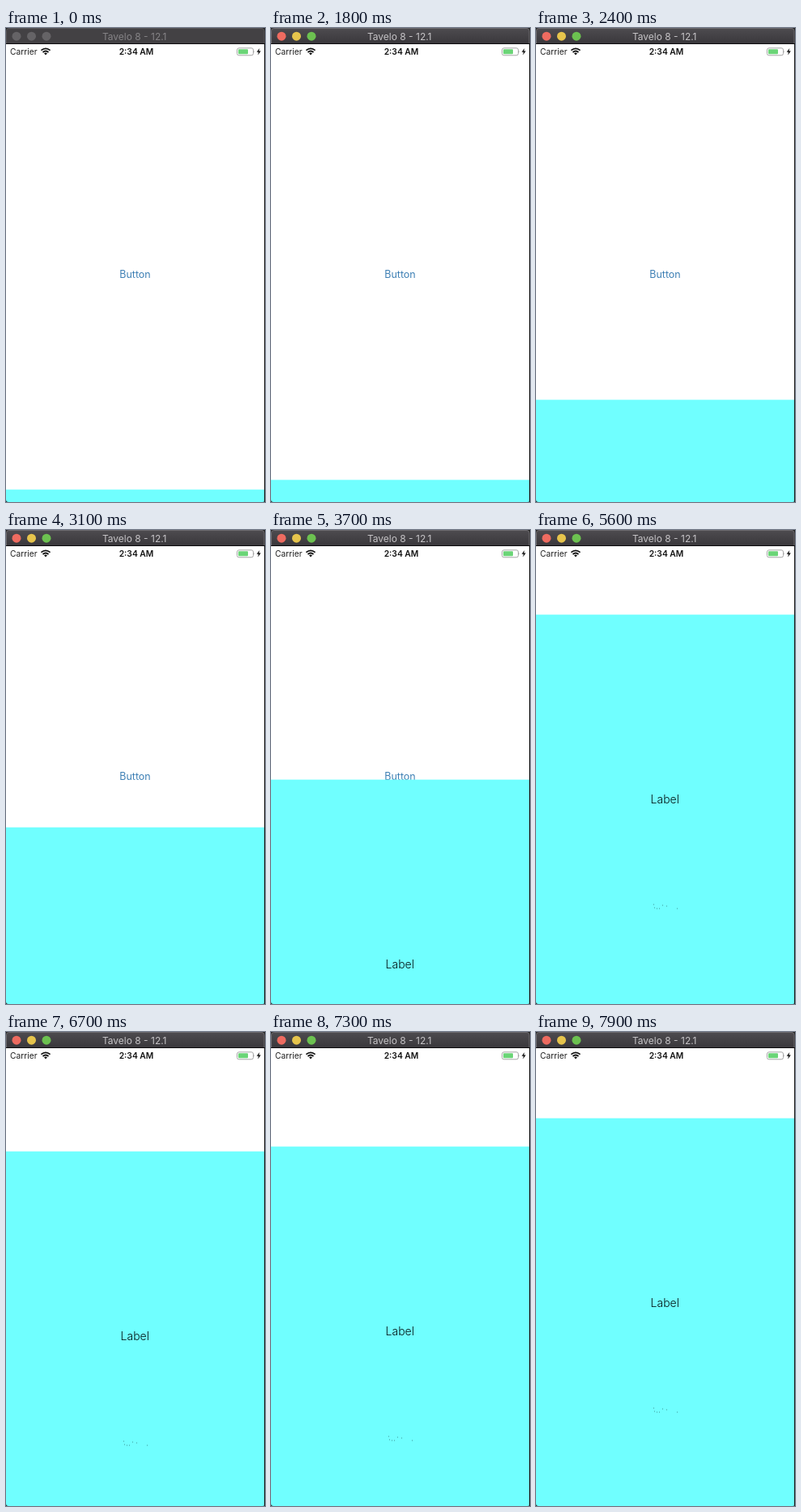
Write an HTML page that moves like this. It is 320 by 586 pixels and loops after 8 s.

```html
<!DOCTYPE html>
<html lang="en">
<head>
<meta charset="utf-8">
<title>Bottom sheet</title>
<style>
html, body { margin: 0; width: 100%; height: 100%; overflow: hidden; background: #fff; }
svg { display: block; width: 100vw; height: 100vh; }
text { font-family: Inter, Roboto, sans-serif; }
.mid { text-anchor: middle; }
</style>
</head>
<body>
<svg viewBox="0 0 320 586">
  <defs>
    <linearGradient id="chrome" x2="0" y2="1">
      <stop stop-color="#4d4b4f"/><stop offset="1" stop-color="#39373b"/>
    </linearGradient>
  </defs>
  <rect width="320" height="586" fill="#fff"/>
  <text class="mid" x="159.5" y="308.7" font-size="12.5" fill="#3f80b5">Button</text>

  <g id="sheet">
    <rect y="-.4" width="320" height="600" fill="#70ffff"/>
    <text class="mid" x="159.3" y="232.6" font-size="14" font-weight="300" fill="#06191a">Label</text>
    <path d="M145 358h1m0 4h1m2 1h1m2 0h1m3-4h1m4 1h1m12 3h1" stroke="#3a9495"/>
  </g>

  <text x="5" y="33" font-size="10.3" fill="#222">Carrier</text>
  <g fill="none" stroke="#111" stroke-width="1.7">
    <path d="M43.4 27.7Q49 22.9 54.6 27.7M45.5 30Q49 27 52.5 30"/>
    <path d="M47 31.3Q49 29.7 51 31.3L49 33.5z" fill="#111" stroke="none"/>
  </g>
  <text class="mid" x="161" y="33" font-size="10.3" font-weight="600" fill="#111">2:34 AM</text>
  <rect x="285.5" y="24.8" width="20" height="9" rx="2.3" fill="#fff" stroke="#a5a5a5"/>
  <rect x="287" y="26.3" width="12" height="6" rx="1" fill="#6bd577"/>
  <path d="M306.5 27.8q1.4 1.5 0 3z" fill="#a5a5a5"/>
  <path d="M313.3 25l-3.6 4.8h2.3l-.9 3.7 3.8-5h-2.4z" fill="#111"/>

  <path d="M319.5 20V586" stroke="#1a1a1a"/>
  <path d="M0 583v3h3Q0 586 0 583M320 583v3h-3Q320 586 320 583" fill="#222"/>
  <rect width="320" height="20" fill="#222"/>
  <path id="bar" d="M.5 20V3.5Q.5 .5 3.5 .5H316Q319 .5 319 3.5V20"/>
  <path d="M0 19.5H320" stroke="#0c0b0d"/>
  <g id="lights">
    <circle cx="13" cy="10.2" r="5.5"/><circle cx="31.5" cy="10.2" r="5.5"/><circle cx="50" cy="10.2" r="5.5"/>
  </g>
  <text id="title" class="mid" x="158.7" y="14.7" font-size="12">Tavelo 8 - 12.1</text>
</svg>
<script>
const LOOP = 8000, STEP = 100;
const $ = id => document.getElementById(id);
const paint = (el, fill, stroke = 'none') => {
  el.setAttribute('fill', fill);
  el.setAttribute('stroke', stroke);
};
const lights = [...$('lights').children];
const lightColors = ['#ee6b60', '#e6c44c', '#6cc150'];

// Sheet top edge during the drags: [ms, y]
const keys = [[0, 571], [1600, 571], [2400, 460], [3100, 368], [4300, 270], [4400, 268],
  [4500, 268], [4800, 237], [5600, 105], [5800, 90], [5900, 90], [6700, 148],
  [6900, 157], [7700, 117], [7900, 107], [LOOP, 102]];

const rate = i => (keys[i + 1][1] - keys[i][1]) / (keys[i + 1][0] - keys[i][0]);

// Slopes that never overshoot between keys
const slopes = keys.map((k, i) => {
  if (!i || i === keys.length - 1) return 0;
  const a = rate(i - 1), b = rate(i);
  return a * b > 0 ? 2 * a * b / (a + b) : 0;
});

function sheetY(t) {
  const i = keys.findIndex((k, n) => t < keys[n + 1][0]);
  const [t0, y0] = keys[i], [t1, y1] = keys[i + 1];
  const d = t1 - t0, u = (t - t0) / d, v = 1 - u;
  return y0 * v * v * (1 + 2 * u) + y1 * u * u * (3 - 2 * u)
    + d * u * v * (slopes[i] * v - slopes[i + 1] * u);
}

function draw(now) {
  const t = Math.floor(now % LOOP / STEP) * STEP;
  const active = t >= 200;
  $('sheet').setAttribute('transform', `translate(0 ${Math.round(sheetY(t))})`);
  paint($('bar'), active ? 'url(#chrome)' : '#434144', active ? '#6c6a6e' : '#565457');
  paint($('title'), active ? '#c6c4c7' : '#858386');
  lights.forEach((c, i) => paint(c, active ? lightColors[i] : '#656366'));
}

const start = performance.now();
function tick() {
  draw(performance.now() - start);
  requestAnimationFrame(tick);
}
tick();
</script>
</body>
</html>
```
